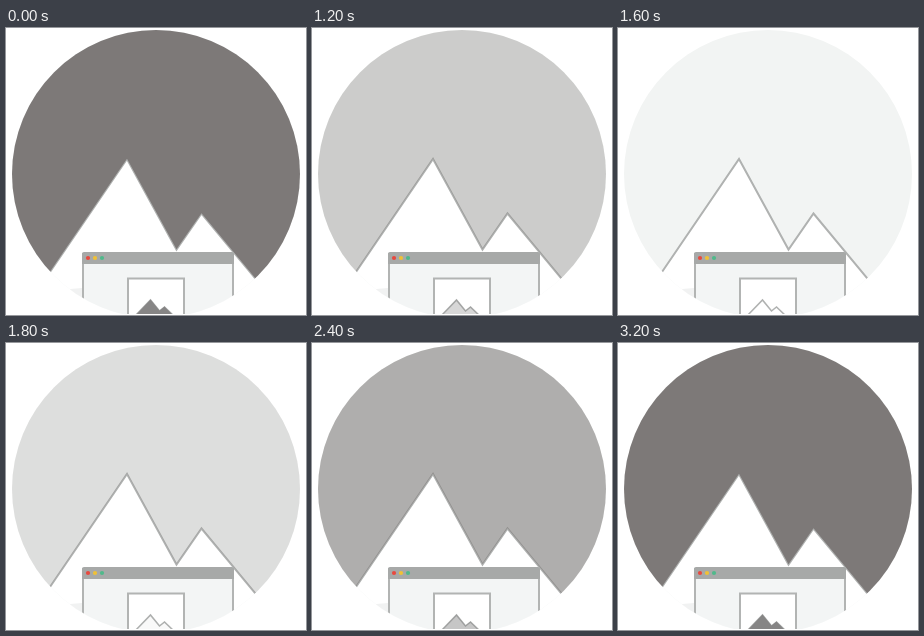
Recreate the animation shown at these times as an HTML page. Size 300 px wide and 287 px high, loop 3400 ms.

```html
<!DOCTYPE html>
<html lang="en">
<head>
<meta charset="utf-8">
<title>Mountain sky</title>
<style>
html, body { margin: 0; width: 100%; height: 100%; overflow: hidden; background: #fff; }
svg { display: block; width: 300px; height: 287px; }
.line { fill: #fff; stroke: #b0b2b1; stroke-width: 2; }
.night { fill: #7d7978; animation: dusk 3400ms step-end infinite; }
.shade { fill: #868585; animation: shade 3400ms step-end infinite; }

/* 17 held steps: out to daylight and back */
@keyframes dusk {
  0%, 94.117%, 100% { opacity: 1; }
  5.882%, 88.235% { opacity: .907; }
  11.764%, 82.352% { opacity: .797; }
  17.647%, 76.470% { opacity: .695; }
  23.529%, 70.588% { opacity: .568; }
  29.411%, 64.705% { opacity: .449; }
  35.294%, 58.823% { opacity: .322; }
  41.176%, 52.941% { opacity: .178; }
  47.058% { opacity: 0; }
}
@keyframes shade {
  0%, 94.117%, 100% { opacity: 1; }
  5.882%, 88.235% { opacity: .87; }
  11.764%, 82.352% { opacity: .74; }
  17.647%, 76.470% { opacity: .58; }
  70.588% { opacity: .47; }
  35.294%, 58.823% { opacity: .33; }
  41.176% { opacity: .15; }
  47.058% { opacity: 0; }
  52.941% { opacity: .05; }
}
</style>
</head>
<body>
<svg viewBox="0 0 300 287">
  <defs>
    <clipPath id="disc"><circle cx="150" cy="146" r="144"/></clipPath>
    <clipPath id="stage"><rect width="300" height="285.5"/></clipPath>
  </defs>
  <g clip-path="url(#stage)"><g clip-path="url(#disc)">
    <rect width="300" height="287" fill="#f2f4f3"/>
    <path class="line" d="M30 264.5 121 131 170.5 221.5 195.5 185.5 264 268V300H30Z"/>
    <path class="night" d="M0 0H300V268H264L195.5 185.2 170.5 221.2 121 130.7 30 264.2H0Z"/>
    <path d="M64 261 76 260V271H64Z" fill="#f1f2f2"/>

    <rect x="77" y="226" width="150" height="70" fill="#f3f5f5" stroke="#b2b4b3" stroke-width="2"/>
    <path d="M76 236V226Q76 224 78 224H226Q228 224 228 226V236Z" fill="#a7a9a8"/>
    <circle cx="82" cy="230" r="2.1" fill="#e8493f"/>
    <circle cx="89" cy="230" r="2.1" fill="#f0c135"/>
    <circle cx="96" cy="230" r="2.1" fill="#4fb98b"/>

    <rect x="122" y="250.5" width="56" height="50" fill="#fff" stroke="#b2b4b3" stroke-width="2"/>
    <g id="photo">
      <path d="M127 290 144.5 272 153.5 283 158.5 279 170 290Z" fill="#fff" stroke="#b0b2b1" stroke-width="1.6"/>
      <path class="shade" d="M127 290 144.5 271.5 153.5 282.5 158.5 278.5 170 290Z"/>
    </g>
  </g></g>
</svg>
</body>
</html>
```
